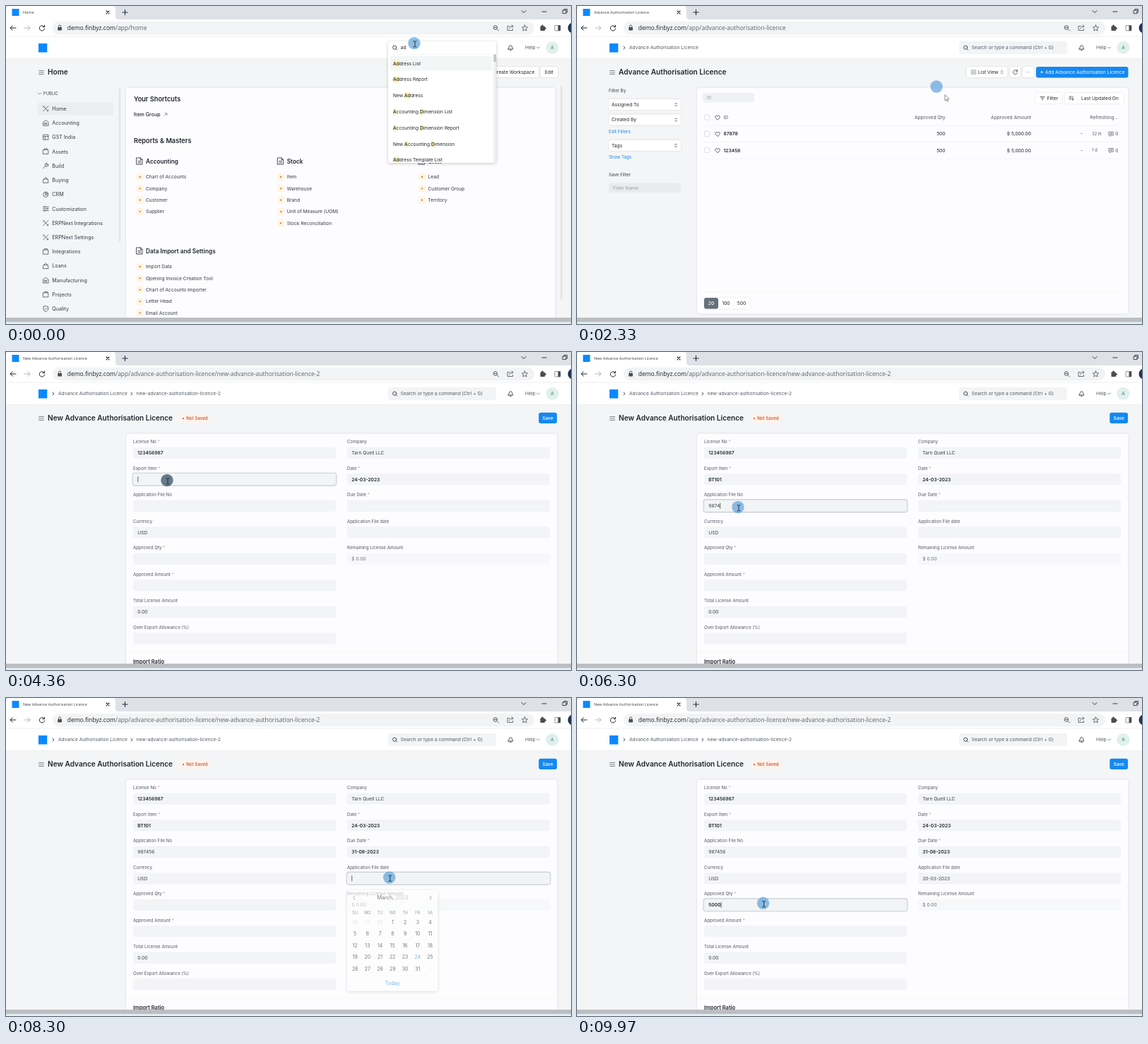
An HTML page for the animation above (10000 ms loop, 800x450 px).

```html
<!DOCTYPE html>
<html lang="en">
<head>
<meta charset="utf-8">
<title>Licence form</title>
<style>
html, body { margin: 0; width: 100%; height: 100%; overflow: hidden; background: #f4f5f6; }
svg { display: block; width: 800px; height: 450px; font-family: Inter, sans-serif; }
.ui { font-family: "Open Sans", sans-serif; }
text { white-space: pre; }
.float { filter: drop-shadow(0 1px 2px rgba(30, 40, 50, .25)); }
.card { filter: drop-shadow(0 .4px .8px rgba(30, 40, 50, .16)); }
</style>
</head>
<body>
<svg id="stage" viewBox="0 0 800 450"></svg>
<script>
const INK = '#1f272e', SOFT = '#505a62', MUTE = '#98a1a9', BLUE = '#1588f0', LINE = '#e9ecee', FILL = '#f2f4f5';
const BODY = 6.67, SMALL = 6.2;
const stage = document.getElementById('stage');
let layer = stage;

function el(tag, attrs, parent = layer) {
  const node = document.createElementNS('http://www.w3.org/2000/svg', tag);
  for (const k in attrs) node.setAttribute(k, attrs[k]);
  return parent.appendChild(node);
}
const rect = (x, y, width, height, fill, rx = 0, stroke = 'none') =>
  el('rect', { x, y, width, height, fill, rx, stroke, 'stroke-width': .6 });
const circle = (cx, cy, r, fill) => el('circle', { cx, cy, r, fill });
const line = (d, stroke = SOFT, w = .8, fill = 'none') =>
  el('path', { d, stroke, fill, 'stroke-width': w, 'stroke-linecap': 'round', 'stroke-linejoin': 'round' });
const icon = (d, x, y, stroke = SOFT, w = .8) => {
  const p = line(d, stroke, w);
  p.setAttribute('transform', `translate(${x} ${y})`);
  return p;
};
// y is the middle of the capitals
function text(x, y, s, size = BODY, fill = INK, weight = 400, anchor = 'start') {
  const t = el('text', { x, y: y + size * .364, 'font-size': size, fill, 'font-weight': weight, 'text-anchor': anchor });
  t.textContent = s;
  return t;
}
function group(build, attrs = {}, parent = stage) {
  const outer = layer, g = el('g', attrs, parent);
  layer = g;
  build(g);
  layer = outer;
  return g;
}
const show = (node, on) => { node.style.display = on ? '' : 'none'; };
const button = (x, w, label, y = 93.5) => {
  group(() => rect(x, y - 7.5, w, 15, '#fff', 3), { class: 'card' }, layer);
  text(x + w / 2, y, label, BODY, INK, 400, 'middle');
};
const panel = (w, h) => group(() => rect(170, 115.5, w, h, '#fdfcfe', 4), { class: 'card' }, layer);
const DOWN = 'M-2 -1L0 1L2 -1', UPDOWN = 'M-1.3 -1L0 -2.3L1.3 -1M-1.3 1L0 2.3L1.3 1';
const MENU = 'M-3.5 -2.5H3.5M-3.5 0H3.5M-3.5 2.5H3.5';
const HEART = 'M0 3.2L-3 0C-4.2 -2.4 -1.2 -4 0 -1.7C1.2 -4 4.2 -2.4 3 0Z';
const LENS = 'M1.8 1.8L3.2 3.2M2.3 -.3A2.6 2.6 0 1 1 -2.9 -.3A2.6 2.6 0 1 1 2.3 -.3';
const TURN = 'M2.6 -1.6A3 3 0 1 0 3 .8M3 -3.4V-1.2H.8';

const heading = s => {
  icon(MENU, 50, 94, SOFT, .7);
  text(59, 93.5, s, 10.1, INK, 600);
};

// ---- home page
const TOOLS = 'M-3.5 -3.5L3.5 3.5M3.5 -3.5L-3.5 3.5M-3.8 -1.8L-1.8 -3.8M1.8 3.8L3.8 1.8';
const BOX = 'M-3.5 -2.5H3.5V3.5H-3.5ZM-2 -2.5V-4H2V-2.5';
const GRID = 'M-3.5 -3.5H3.5V3.5H-3.5ZM-3.5 -1H3.5M-1 -1V3.5';
const BAG = 'M-3 -1.5H3L3.6 3.8H-3.6ZM-1.6 -1.5C-1.6 -4.6 1.6 -4.6 1.6 -1.5';
const BANK = 'M-3.8 3.5V-1L0 -3.8L3.8 -1V3.5ZM-1.5 .2H1.5V2H-1.5Z';
const SLIDERS = 'M-4 -2.7H4M-4 0H4M-4 2.7H4M-1.5 -3.6V-1.8M1.8 -.9V.9M-1.5 1.8V3.6';
const PIE = 'M3.6 .6A3.7 3.7 0 1 1 -.6 -3.6V.6ZM1 -3.6A3.4 3.4 0 0 1 3.6 -1H1Z';
const WRENCH = 'M-3.6 3.6L.5 -.5M3.8 -1.8A2.4 2.4 0 1 1 1.8 -3.8L1.6 -1.7Z';
const SHIELD = 'M0 -4L3.4 -2.8V0C3.4 2 1.6 3.4 0 4C-1.6 3.4 -3.4 2 -3.4 0V-2.8ZM-1.4 0L-.3 1L1.5 -1';

const home = group(() => {
  heading('Home');
  button(676, 78, '');
  text(748.5, 93.5, 'Create Workspace', BODY, INK, 400, 'end');
  button(757, 24, 'Edit');
  icon(DOWN, 47.5, 124, SOFT, .7);
  text(53, 124, 'PUBLIC', 5.73, SOFT, 500);
  rect(45, 136, 107, 18.5, '#ebedef', 3);
  [['Home', TOOLS], ['Accounting', BANK], ['GST India', GRID], ['Assets', BOX], ['Build', WRENCH], ['Buying', BAG],
   ['CRM', PIE], ['Customization', SLIDERS], ['ERPNext Integrations', TOOLS], ['ERPNext Settings', TOOLS],
   ['Integrations', BOX], ['Loans', BAG], ['Manufacturing', BANK], ['Projects', BOX], ['Quality', SHIELD]
  ].forEach(([name, d], i) => {
    const y = 145.2 + 20.24 * i;
    icon(d, 56.3, y, SOFT, .85);
    text(65.3, y, name, 7.2, '#333c44');
  });
  rect(159.5, 116, 3, 218, '#e4e7e9', 1.5);
  rect(785, 113, 3, 303, '#e4e7e9', 1.5);
  panel(607.5, 340);
  text(181, 132, 'Your Shortcuts', 9.2, INK, 600);
  text(181, 153.7, 'Item Group', 7.1, INK, 500);
  icon('M-1.8 1.8L1.8 -1.8M-1 -1.8H1.8V1', 226, 153.7, SOFT, .6);
  text(181, 191, 'Reports & Masters', 9.2, INK, 600);
  const card = (x, y, title, links) => {
    icon('M-4 -4.6H1.5L4 -2V4.6H-4ZM1.5 -4.6V-2H4M-2 0H2M-2 2.3H2', x + 5, y, INK, .8);
    text(x + 14, y, title, 8.25, INK, 600);
    links.forEach((s, i) => {
      const ly = y + 22.4 + 16.35 * i;
      rect(x + .5, ly - 5, 10, 10, '#fff4e2', 2.5);
      circle(x + 5.5, ly, 1.05, '#b8741a');
      text(x + 14, ly, s, BODY, '#333c44');
    });
  };
  card(184, 219.5, 'Accounting', ['Chart of Accounts', 'Company', 'Customer', 'Supplier']);
  card(383.7, 219.5, 'Stock', ['Item', 'Warehouse', 'Brand', 'Unit of Measure (UOM)', 'Stock Reconciliation']);
  card(583.5, 219.5, 'CRM', ['Lead', 'Customer Group', 'Territory']);
  card(184, 346.5, 'Data Import and Settings',
    ['Import Data', 'Opening Invoice Creation Tool', 'Chart of Accounts Importer', 'Letter Head', 'Email Account']);
});

// ---- list page
let status;
const list = group(() => {
  heading('Advance Authorisation Licence');
  button(552, 57.5, '');
  icon(MENU, 561.5, 93.5, SOFT, .7);
  text(568, 93.5, 'List View');
  icon(UPDOWN, 601.5, 93.5, INK, .7);
  button(613, 15, '');
  icon(TURN, 620.5, 93.5, INK, .7);
  button(631, 16, '···');
  rect(650, 86, 130.5, 15.5, BLUE, 3);
  icon('M-1.8 0H1.8M0 -1.8V1.8', 658, 93.6, '#fff', .7);
  text(775.3, 93.5, 'Add Advance Authorisation Licence', BODY, '#fff', 400, 'end');

  const caption = (y, s) => text(45, y, s, SMALL, SOFT, 500);
  const select = (y, s) => {
    group(() => rect(45, y - 7.5, 102, 15, '#fff', 3), { class: 'card' }, layer);
    text(49, y, s);
    icon(UPDOWN, 140, y, INK, .7);
  };
  caption(120, 'Filter By');
  select(139.5, 'Assigned To');
  select(161, 'Created By');
  text(45, 178, 'Edit Filters', SMALL, BLUE);
  select(197.3, 'Tags');
  text(45, 214, 'Show Tags', SMALL, BLUE);
  caption(238.5, 'Save Filter');
  rect(45, 250.5, 102, 13.5, '#e9ecee', 3);
  text(51, 257.5, 'Filter Name', BODY, MUTE);

  panel(610.5, 320);
  rect(178, 123, 73, 13.5, '#eff1f2', 3);
  text(184, 130, 'ID', SMALL, MUTE);
  button(649, 37.5, '', 130.5);
  icon('M-3 -2H3M-1.9 0H1.9M-.7 2H.7', 659, 130.5, INK, .7);
  text(665.5, 130.5, 'Filter');
  button(691, 83, '', 130.5);
  line('M708.5 123.5V137.5', LINE, .6);
  icon('M-3 -2.4H0M-3 -.4H.2M-3 1.6H-1M2 -2.5V2.5M.6 1.2L2 2.6L3.4 1.2', 700, 130.5, INK, .7);
  text(714, 130.5, 'Last Updated On');

  const check = y => {
    rect(180.5, y - 3.7, 7.2, 7.2, '#fff', 1.5, '#c3c9ce');
    icon(HEART, 199, y + .2, INK, .7);
  };
  const right = (x, y, s, fill = INK) => text(x, y, s, BODY, fill, 400, 'end');
  check(157.7);
  text(207.5, 157.7, 'ID', BODY, SOFT);
  right(521.5, 157.7, 'Approved Qty', SOFT);
  right(643, 157.7, 'Approved Amount', SOFT);
  status = right(766, 157.7, '', SOFT);
  [['87878', '32 m'], ['123456', '1 d']].forEach(([id, age], i) => {
    const y = 181 + 23.2 * i;
    line(`M178 ${y - 11.7}H773`, LINE, .5);
    check(y);
    text(207.5, y, id, BODY, INK, 600);
    right(521.5, y, '500');
    right(643, y, '$ 5,000.00');
    text(713, y, '-');
    text(729.3, y, age, 5.6, SOFT);
    icon('M-3 -2.8H3V2H0L-1.5 3.4V2H-3ZM-1.5 -1H1.5M-1.5 .4H1', 756.3, y, SOFT, .7);
    text(762.3, y, '0', BODY, SOFT);
  });
  line('M178 216.2H773M178 405H773', LINE, .5);
  group(() => rect(180, 413, 65, 15.5, '#fff', 3), { class: 'card' }, layer);
  rect(180, 413, 20, 15.5, '#64707a', 3);
  line('M222 413V428.5', LINE, .5);
  text(190, 420.8, '20', BODY, '#fff', 500, 'middle');
  text(211, 420.8, '100', BODY, INK, 400, 'middle');
  text(233, 420.8, '500', BODY, INK, 400, 'middle');
});

// ---- form page
const rowY = row => 142.7 + 37.52 * row;
const values = {};
let focusBox, caret;
const form = group(() => {
  heading('New Advance Authorisation Licence');
  rect(247, 87.8, 42.5, 12.4, '#fff3ec', 6);
  circle(251, 94, 1.1, '#c4502a');
  text(255.2, 94, 'Not Saved', SMALL, '#c4502a', 500);
  rect(754.3, 85.8, 25.8, 15.3, BLUE, 3);
  text(767.2, 93.5, 'Save', BODY, '#fff', 500, 'middle');
  panel(610.5, 340);
  const field = (x, row, label, req, value = '', fill = FILL, ink = '#38414a') => {
    const y = rowY(row);
    const t = text(x, y - 15.6, label, SMALL, SOFT);
    if (req) el('tspan', { fill: '#e0958c' }, t).textContent = ' *';
    rect(x, y - 8, 287, 16, fill, 3);
    values[label] = text(x + 6.3, y, value, BODY, req ? INK : ink, req ? 600 : 400);
  };
  field(180, 0, 'License No', 1);
  field(180, 1, 'Export Item', 1);
  field(180, 2, 'Application File No');
  field(180, 3, 'Currency', 0, 'USD');
  field(180, 4, 'Approved Qty', 1);
  field(180, 5, 'Approved Amount', 1);
  field(180, 6, 'Total License Amount', 0, '0.00');
  field(180, 7, 'Over Export Allowance (%)');
  field(483, 0, 'Company', 0, 'Tarn Quell LLC');
  field(483, 1, 'Date', 1, '24-03-2023');
  field(483, 2, 'Due Date', 1);
  field(483, 3, 'Application File date');
  field(483, 4, 'Remaining License Amount', 0, '$ 0.00', '#f7f8f9', '#6b757d');
  line('M170 425H780', LINE, .5);
  text(180, 438.3, 'Import Ratio', 7.5, INK, 600);
  focusBox = rect(0, 0, 288.6, 17.8, 'none', 3.5, '#c4cbd0');
  focusBox.setAttribute('stroke-width', 1.1);
  caret = rect(0, 0, .7, 8, INK);
});

const itemMenu = group(() => {
  group(() => rect(180, 192.5, 287, 148, '#fff', 3), { class: 'float' }, layer);
  rect(183, 195.5, 281, 22, FILL, 3);
  ['BT101', 'BT102', 'BT103', 'BT104', '+  Create a new Item', 'Advanced Search'].forEach((s, i) =>
    text(188, 206.5 + 24 * i, s, BODY, i > 3 ? SOFT : INK, i > 3 ? 400 : 500));
});

// ---- date picker
const MONTHS = ['March', 'April', 'May', 'June', 'July', 'August'];
const picker = group(() => {}, { class: 'float' });
const colX = c => 494.2 + 17.72 * c, weekY = r => 278.3 + 16.4 * r;
let pickerKey;
function drawPicker(month, hover) {
  const key = month + '/' + hover;
  if (key === pickerKey) return;
  pickerKey = key;
  picker.textContent = '';
  const m = month + 2, first = new Date(2023, m, 1).getDay(), days = new Date(2023, m + 1, 0).getDate();
  const rows = Math.ceil((first + days) / 7), foot = weekY(rows) + 4.4;
  const outer = layer;
  layer = picker;
  rect(483, 233, 128.5, foot + 11 - 233, '#fff', 3);
  icon('M1 -2.5L-1.5 0L1 2.5', 493, 243.6, SOFT, .9);
  icon('M-1 -2.5L1.5 0L-1 2.5', 601, 243.6, SOFT, .9);
  const title = text(547.4, 243.5, MONTHS[month] + ', ', 7.3, INK, 400, 'middle');
  el('tspan', { fill: MUTE }, title).textContent = '2023';
  ['SU', 'MO', 'TU', 'WE', 'TH', 'FR', 'SA'].forEach((s, c) => text(colX(c), 264.5, s, 5.6, SOFT, 400, 'middle'));
  for (let i = 0; i < rows * 7; i++) {
    const date = new Date(2023, m, 1 - first + i), inside = date.getMonth() === m;
    const x = colX(i % 7), y = weekY(Math.floor(i / 7)), today = m === 2 && inside && date.getDate() === 24;
    if (i === hover) rect(x - 8.8, y - 8, 17.6, 16, '#eff1f2', 2);
    text(x, y, date.getDate(), 7, today ? BLUE : inside ? INK : '#d3d8dc', 400, 'middle');
  }
  line(`M483 ${foot - 10.2}H611.5`, LINE, .5);
  text(547.2, foot, 'Today', 7.2, BLUE, 400, 'middle');
  layer = outer;
}

// ---- site bar
let crumb, crumbNew;
group(() => {
  rect(0, 43, 800, 31.5, '#fff');
  line('M0 74.7H800', '#e3e6e8', .6);
  rect(46, 53, 12.3, 12.6, '#0a89ff', 0);
  crumb = group(() => {
    icon('M-1 -2L1 0L-1 2', 67, 59, INK, .8);
    text(74, 59, 'Advance Authorisation Licence', BODY, SOFT);
  }, {}, layer);
  crumbNew = group(() => {
    icon('M-1 -2L1 0L-1 2', 178, 59, INK, .8);
    text(184.5, 59, 'new-advance-authorisation-licence-2', BODY, SOFT);
  }, {}, layer);
  rect(541, 50, 153, 18, FILL, 3);
  icon(LENS, 550.5, 59, INK, .8);
  icon('M-3.4 2H3.4C2 .6 2.4 -3.4 0 -3.4C-2.4 -3.4 -2 .6 -3.4 2ZM-1 3.4H1', 714.5, 59, INK, .8);
  text(735, 59, 'Help', BODY, SOFT);
  icon(DOWN, 753.5, 59, SOFT, .7);
  circle(773.5, 59, 9, '#e0f0ec');
  text(773.5, 59, 'A', 6.5, '#2f7f70', 400, 'middle');
});
const hint = text(558.7, 59, 'Search or type a command (Ctrl + G)', BODY, SOFT);

// ---- search results; brackets mark the matching letters
function results(items) {
  return group(() => {
    items.forEach((item, i) => {
      const t = text(548, 81.2 + 22.8 * i, '');
      const marks = [];
      let n = 0;
      item.split(/[\[\]]/).forEach((part, k) => {
        if (!part) return;
        el('tspan', k % 2 ? { 'font-weight': 500 } : {}, t).textContent = part;
        if (k % 2) marks.push([n, part.length]);
        n += part.length;
      });
      for (const [at, len] of marks) {
        const x = t.getStartPositionOfChar(at).x, w = t.getSubStringLength(at, len);
        layer.insertBefore(rect(x, 76.5 + 22.8 * i, w, 9.5, '#fdf1bd', 1), t);
      }
    });
  }, { 'clip-path': 'url(#drop)' }, layer);
}
let query, hits;
const clip = el('clipPath', { id: 'drop' });
el('rect', { x: 541, y: 68, width: 153, height: 153.5 }, clip);
const search = group(() => {
  group(() => rect(541, 50, 153, 172, '#fff', 3), { class: 'float' }, layer);
  line('M541 68.3H694', LINE, .5);
  rect(544, 71, 144.5, 20.5, '#f4f5f6', 3);
  rect(690.5, 68.5, 3.5, 153, '#eceeef');
  rect(690.5, 68.5, 3.5, 10.5, '#c3c6c9');
  icon(LENS, 550.5, 59, INK, .8);
  query = text(558.7, 59, '');
  hits = [
    results(['[Ad]dress List', '[Ad]dress Report', 'New [Ad]dress', '[A]ccounting [D]imension List',
      '[A]ccounting [D]imension Report', 'New [A]ccounting [D]imension', '[Ad]dress Template List']),
    results(['[Adv]ance Authorisation Licence List', '[Adv]ance Authorisation Licence Report',
      'New [Adv]ance Authorisation Licence', 'Search for [adv]', 'Find [adv] in Global Search', 'Help on [adv]'])
  ];
});

// ---- browser frame
let tabName, address;
group(() => {
  rect(0, 0, 800, 20, '#dee1e6');
  line('M0 19V4Q0 0 4 0H151Q155 0 155 4V15Q155 19 160 19Z', 'none', 0, '#fff');
  rect(0, 19, 800, 24, '#fff');
  line('M0 43H800', '#e3e5e8', .6);
  rect(8.5, 4, 10, 10, '#0a89ff');
  tabName = text(24, 9, '', 5.47, '#3c4043');
  icon('M-2 -2L2 2M2 -2L-2 2', 144, 9, INK, 1.1);
  icon('M-3.6 0H3.6M0 -3.6V3.6', 168.5, 9, INK, 1);
  icon('M-3 -1.5L0 1.5L3 -1.5', 733, 8, INK, .9);
  icon('M-3 0H3', 762, 8, INK, .9);
  icon('M-3 -1.5H1.5V3H-3ZM-1.5 -1.5V-3H3V1.5H1.5', 791.5, 7.5, INK, .8);
  icon('M4 0H-4M-.8 -3.2L-4 0L-.8 3.2', 10, 31, INK, 1);
  icon('M-4 0H4M.8 -3.2L4 0L.8 3.2', 30, 31, '#b4b7ba', 1);
  icon('M3.2 -1.8A3.7 3.7 0 1 0 3.7 .8M3.6 -4V-1.5H1.1', 51, 31.2, INK, 1);
  rect(66, 22, 682, 18.5, '#f1f3f4', 9);
  rect(73.2, 30, 5.8, 4.6, '#4a4e52', .8);
  line('M74.5 30V28.6A1.6 1.6 0 0 1 77.7 28.6V30', '#4a4e52', .9);
  address = text(86.7, 31.2, '', 8.53, '#5f6368');
  icon('M1.8 1.8L4 4M2.2 -.5A2.8 2.8 0 1 1 -3.4 -.5A2.8 2.8 0 1 1 2.2 -.5M-2 -.5H.8', 693.5, 31, '#4a4e52', .9);
  icon('M-1 -2.5H-4V3.5H3.5V1.5M-1.5 1C-1 -1.5 1 -2.3 4 -2.3M2 -4.2L4 -2.3L2 -.4', 714, 31, '#4a4e52', .8);
  icon('M0 -4L1.2 -1.2L4.2 -1L1.9 1L2.6 4L0 2.4L-2.6 4L-1.9 1L-4.2 -1L-1.2 -1.2Z', 734.5, 31, '#4a4e52', .8);
  rect(756.5, 28.5, 6.5, 6.5, '#4a4e52', .8);
  circle(759.5, 28, 1.5, '#4a4e52');
  circle(763.3, 31.5, 1.5, '#4a4e52');
  rect(777, 27.5, 8, 7.5, 'none', .8, '#4a4e52');
  rect(781.5, 27.5, 3.5, 7.5, '#4a4e52');
  circle(803, 31, 7.5, '#1f3556');
  rect(0, 441, 800, 6.5, '#bcbec2');
  rect(0, 447.5, 800, 2.5, '#e0f3f7');
}, { class: 'ui' });

// ---- pointer
const halo = circle(0, 0, 8.7, '');
const shapes = {
  beam: group(() => line('M-1 -2.9Q1 -2.9 1 -1.9Q1 -2.9 3 -2.9M1 -1.9V4.5M-1 5.5Q1 5.5 1 4.5Q1 5.5 3 5.5', '#222', .9)),
  arrow: group(() => line('M0 0V8L1.9 6.3L3.2 9.2L4.5 8.6L3.2 5.8H5.6Z', '#444', .6, '#fff')),
  hand: group(() => line('M0 0Q1 -.9 1.5 .2V3.6L5 4.5Q5.6 5 5.2 6.6L4.6 9H.6L-2 5.8Q-1.8 4.6 0 5.8Z', '#444', .6, '#fff'))
};
const route = [
  [0, 578, 52.6, 'beam'], [500, 578, 52.6, 'arrow'], [850, 600, 130, 'arrow'], [1130, 590, 84, 'hand'],
  [1400, 590, 84, 'arrow'], [1900, 492, 98, 'arrow'], [2240, 509, 114, 'arrow'], [2330, 521, 126, 'arrow'],
  [2680, 715, 95, 'hand'], [3080, 715, 95, 'arrow'], [3380, 228, 144, 'beam'], [4180, 228, 144, 'beam'],
  [4270, 228, 181.5, 'beam'], [4500, 228, 181.5, 'arrow'], [4800, 226, 207, 'hand'], [5240, 226, 207, 'arrow'],
  [5560, 228, 219.5, 'beam'], [6440, 228, 219.5, 'arrow'], [6580, 545, 218, 'arrow'], [6640, 545, 218, 'arrow'],
  [6740, 601, 243, 'hand'], [7000, 601, 243, 'hand'], [7120, 541, 271, 'hand'], [7210, 552, 317, 'hand'],
  [7400, 565, 344, 'hand'], [7650, 565, 344, 'arrow'], [8080, 542.8, 254, 'beam'], [8330, 542.8, 254, 'arrow'],
  [8750, 512, 366, 'hand'], [8950, 512, 366, 'arrow'], [9250, 512, 251, 'beam'], [9420, 512, 251, 'arrow'],
  [9600, 263.6, 290.3, 'beam']
];
const clicks = [1200, 2800, 3430, 4330, 4950, 5780, 6620, 6750, 6805, 6860, 6915, 6970, 7500, 8200, 8850, 9650];
function pointer(t) {
  let i = route.length - 1;
  while (i && route[i][0] > t) i--;
  const a = route[i], b = route[i + 1] || a;
  const p = b === a ? 0 : Math.max(0, (t - a[0]) / (b[0] - a[0])), e = p * p * (3 - 2 * p);
  return { x: a[1] + (b[1] - a[1]) * e, y: a[2] + (b[2] - a[2]) * e, kind: a[3] };
}

// label, x, row, start, end
const focus = [
  ['License No', 180, 0, 3430, 4330], ['Export Item', 180, 1, 4330, 5000], ['Application File No', 180, 2, 5780, 6620],
  ['Due Date', 483, 2, 6620, 7500], ['Application File date', 483, 3, 8200, 8850], ['Approved Qty', 180, 4, 9650, 10000]
];
const typed = (s, t, start, step) => s.slice(0, Math.max(0, Math.floor((t - start) / step) + 1));
const clamp = v => Math.min(1, Math.max(0, v));
const SLUG = 'advance-authorisation-licence', NAME = 'Advance Authorisation Licence';
function put(node, s) { if (node.textContent !== s) node.textContent = s; }

function frame() {
  const t = performance.now() % 10000;
  const page = t < 1350 ? 0 : t < 2950 ? 1 : 2;
  [home, list, form].forEach((p, i) => show(p, i === page));
  put(tabName, ['Home', NAME, 'New ' + NAME][page]);
  if (address.dataset.page !== String(page)) {
    address.dataset.page = page;
    address.textContent = '';
    el('tspan', { fill: '#202124' }, address).textContent = 'demo.finbyz.com';
    el('tspan', {}, address).textContent = '/app/' + ['home', SLUG, `${SLUG}/new-${SLUG}-2`][page];
  }
  show(crumb, page > 0);
  show(crumbNew, page > 1);
  show(hint, t >= 1230);
  show(search, t < 1230);
  put(query, t < 250 ? 'ad' : 'adv');
  hits.forEach((h, i) => show(h, (t >= 330) === !!i));
  put(status, t < 2450 ? 'Refreshing...' : '2 of 2');

  put(values['License No'], typed('123456987', t, 3530, 72));
  put(values['Export Item'], t < 4950 ? '' : 'BT101');
  put(values['Application File No'], typed('987456', t, 5900, 110));
  put(values['Due Date'], t < 7500 ? '' : '31-08-2023');
  put(values['Application File date'], t < 8850 ? '' : '20-03-2023');
  put(values['Approved Qty'], typed('5000', t, 9720, 65));
  const f = focus.find(f => t >= f[3] && t < f[4]);
  show(focusBox, f);
  show(caret, f && (t - f[3]) % 1060 < 530);
  if (f && page === 2) {
    const [label, x, row] = f, y = rowY(row);
    focusBox.setAttribute('x', x - .8);
    focusBox.setAttribute('y', y - 8.9);
    caret.setAttribute('x', x + 6.5 + values[label].getComputedTextLength());
    caret.setAttribute('y', y - 4);
  }
  show(itemMenu, t >= 4460 && t < 4950);

  const now = pointer(t), late = pointer(t - 90);
  const second = t > 8000, start = second ? 8210 : 6630, end = second ? 8850 : 7500;
  const fade = clamp((t - start) / 150) * (1 - clamp((t - end) / 150));
  show(picker, fade > 0);
  if (fade > 0) {
    const col = Math.round((late.x - 494.2) / 17.72);
    const top = second ? 37.5 : 0, row = Math.round((late.y - top - 278.3) / 16.4);
    drawPicker(second ? 0 : clicks.filter(c => c >= 6750 && c <= 6970 && c <= t).length,
      row >= 0 && row < 5 && col >= 0 && col < 7 ? row * 7 + col : -1);
    picker.style.opacity = fade;
    picker.setAttribute('transform', `translate(0 ${top + (1 - fade) * 4})`);
  }

  const down = clicks.some(c => t >= c && t < c + 80);
  halo.setAttribute('fill', down ? 'rgba(62,88,112,.78)' : 'rgba(92,162,220,.7)');
  halo.setAttribute('transform', `translate(${late.x} ${late.y})`);
  for (const k in shapes) {
    show(shapes[k], k === now.kind);
    shapes[k].setAttribute('transform', `translate(${now.x} ${now.y})`);
  }
  requestAnimationFrame(frame);
}
frame();
</script>
</body>
</html>
```
